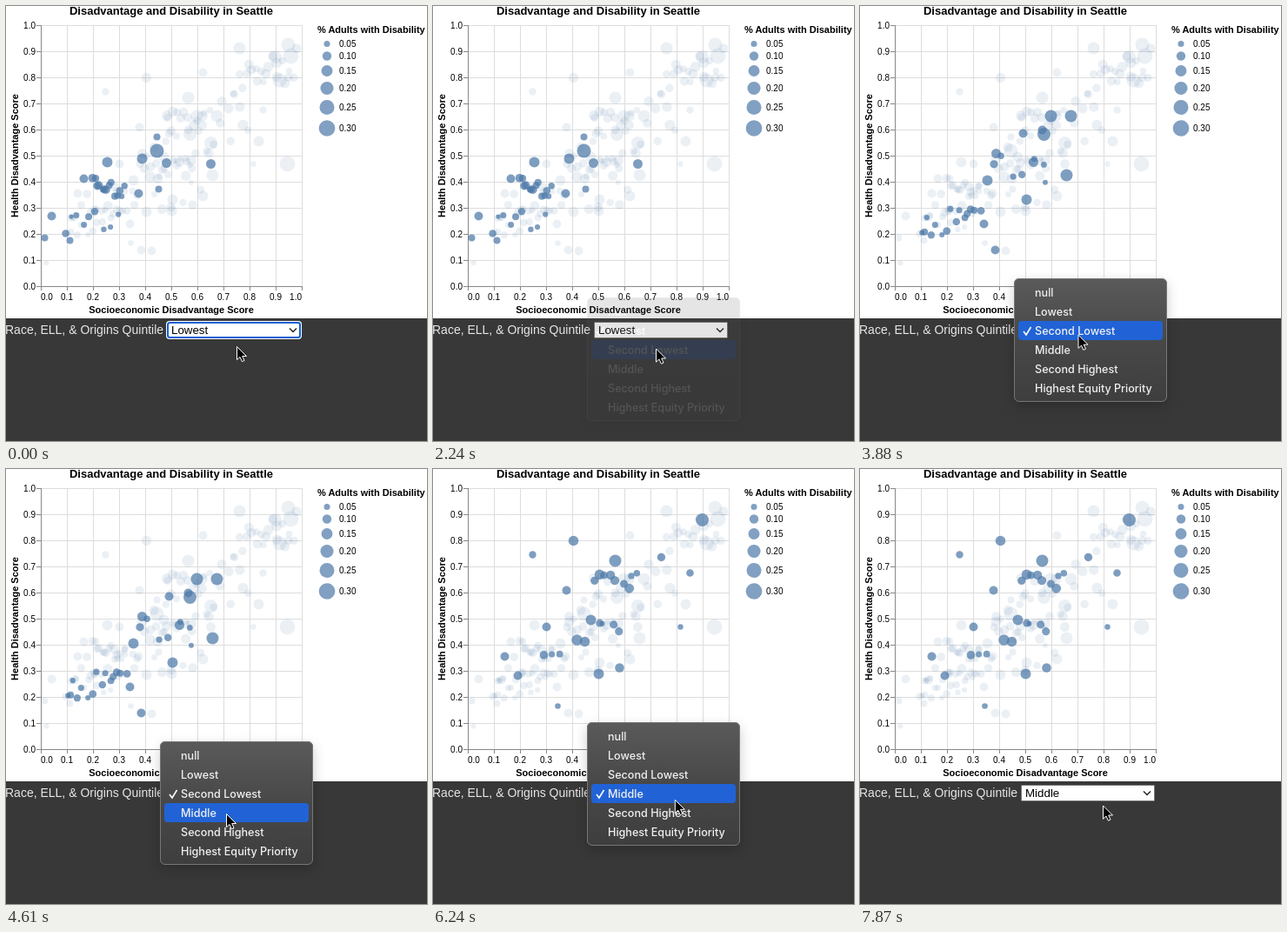
Recreate the animation shown at these times as an HTML page. Size 484 by 500 pixels, loop 8000 ms.

```html
<!DOCTYPE html>
<html lang="en">
<head>
<meta charset="utf-8">
<title>Disadvantage and Disability</title>
<style>
html, body { margin: 0; width: 100%; height: 100%; overflow: hidden; background: #383838; }
svg { display: block; width: 484px; height: 500px; font: 10px "Liberation Sans", Arial, sans-serif; }
.bold { font-weight: bold; font-size: 11px; }
.mid { text-anchor: middle; }
.end { text-anchor: end; }
#dots { fill: #4c78a8; }
#menu text { font: 500 12.6px Inter, "Open Sans", sans-serif; fill: #f0f0f0; }
#panel { filter: drop-shadow(0 5px 7px #0003); }
</style>
</head>
<body>
<svg viewBox="0 0 484 500">
  <defs>
    <linearGradient id="shade" x2="0" y2="1">
      <stop stop-color="#5a5a5a"/><stop offset=".5" stop-color="#484848"/><stop offset="1" stop-color="#3e3e3e"/>
    </linearGradient>
  </defs>
  <rect width="484" height="500" fill="#383838"/>
  <rect width="484" height="359" fill="#fff"/>
  <g id="axes"></g>
  <g id="dots"></g>
  <text class="bold mid" x="190" y="10" style="font-size:13px">Disadvantage and Disability in Seattle</text>
  <text class="bold mid" x="190" y="353">Socioeconomic Disadvantage Score</text>
  <text class="bold mid" transform="translate(13.5 172) rotate(-90)">Health Disadvantage Score</text>
  <g id="legend"><text class="bold" x="358" y="31">% Adults with Disability</text></g>

  <text x="-1" y="377" font-size="14" fill="#e6e6e6">Race, ELL, &amp; Origins Quintile</text>
  <rect x="185.5" y="363.5" width="153" height="18" rx="1" fill="#fff" stroke="#767676"/>
  <g id="ring">
    <rect x="184" y="362" width="156" height="21" rx="4" fill="#fff"/>
    <rect x="186" y="364" width="152" height="17" rx="2.5" fill="#fff" stroke="#1160d2" stroke-width="2"/>
  </g>
  <text id="value" x="190" y="377" font-size="13.333"></text>
  <path d="M326 370.5l4 4 4-4" fill="none" stroke="#222" stroke-width="1.4"/>

  <g id="menu">
    <rect id="panel" x="177" width="176" height="142" rx="6" fill="url(#shade)"/>
    <rect x="177.5" y=".5" width="175" height="141" rx="5.5" fill="none" stroke="#777"/>
    <rect id="bar" x="182" width="166" height="22" rx="4" fill="#2163d6"/>
    <path id="check" fill="none" stroke="#fff" stroke-width="1.6"/>
  </g>
  <path id="arrow" d="M0 0V15.2L3.5 12 5.9 17.2 8.5 16 6.2 11H11Z" stroke="#fff" stroke-linejoin="round"/>
</svg>
<script>
const $ = id => document.getElementById(id);
function add(parent, tag, attrs, text) {
  const el = document.createElementNS("http://www.w3.org/2000/svg", tag);
  for (const k in attrs) el.setAttribute(k, attrs[k]);
  if (text) el.textContent = text;
  return parent.appendChild(el);
}

// Axes and grid
const axes = $("axes");
const line = (d, stroke) => add(axes, "path", { d, stroke, fill: "none" });
for (let i = 0; i <= 10; i++) {
  const x = 40.5 + 30 * i, y = 322.5 - 30 * i, label = (i / 10).toFixed(1);
  line(`M${x} 22V322M40 ${y}H340`, "#ddd");
  line(`M${x} 322v5M35 ${y}h5`, "#888");
  add(axes, "text", { x: 34, y: y + 3, class: "end" }, label);
  add(axes, "text", { x: x - .5, y: 338, class: i == 10 ? "end" : i ? "mid" : "" }, label);
}
line("M40.5 22V322.5H340.5", "#888");

// Legend
[43, 57, 74, 94, 116, 140].forEach((y, i) => {
  const share = (i + 1) * .05;
  add($("legend"), "circle", { cx: 369, cy: y + .5, r: 18 * Math.sqrt(share) - .5, fill: "#4c78a8", "fill-opacity": .7 });
  add($("legend"), "text", { x: 383, y: y + 3.5 }, share.toFixed(2));
});

// Each quintile: a few marked dots, plus seeded dots scattered about a line
let seed = 11;
const rand = () => (seed = seed * 16807 % 2147483647) / 2147483647;

function dots(opacityGroup, ...marked) {
  for (const [x, y, r] of marked)
    add(opacityGroup, "circle", { cx: x + .5, cy: y + .5, r });
}
function scatter(group, n, [x0, y0], [x1, y1], jitter, size) {
  for (let i = 0; i < n; i++) {
    const u = (i + rand()) / n, off = (rand() - .5) * 2 * jitter;
    dots(group, [x0 + (x1 - x0) * u, y0 + (y1 - y0) * u + off, size * (.75 + .5 * rand())]);
  }
}
const [upper, lowest, second, middle] = [0, 1, 2, 3].map(() => add($("dots"), "g", {}));

dots(upper, [323, 181, 9], [324, 44, 8], [327, 57, 9], [314, 85, 8], [268, 48, 7], [235, 157, 7.5],
  [226, 76, 5], [290, 155, 6], [226, 218, 6], [161, 236, 6], [167, 281, 5], [46, 295, 3]);
scatter(upper, 20, [268, 80], [334, 68], 20, 5);
scatter(upper, 24, [165, 160], [280, 125], 32, 5);
scatter(upper, 24, [70, 245], [225, 190], 28, 4.6);

dots(lowest, [173, 166, 8], [235, 181, 5.5], [184, 180, 5.5], [156, 175, 6], [173, 150, 4], [116, 179, 6],
  [89, 198, 5], [52, 241, 5], [44, 266, 4], [73, 269, 4], [152, 215, 5], [175, 210, 4]);
scatter(lowest, 14, [98, 202], [136, 214], 8, 4);
scatter(lowest, 9, [60, 258], [133, 240], 13, 3.5);

dots(second, [242, 126, 7], [219, 126, 7], [211, 147, 7.5], [209, 142, 5], [237, 194, 7], [191, 222, 6],
  [187, 146, 5], [155, 280, 5], [146, 200, 6], [156, 169, 5.5], [199, 179, 5.5], [142, 250, 5]);
scatter(second, 15, [66, 258], [140, 232], 16, 3.8);
scatter(second, 7, [150, 182], [222, 192], 16, 3.8);

dots(middle, [309, 58, 7.5], [209, 105, 7], [161, 82, 5.8], [114, 98, 4.2], [262, 101, 4.7], [295, 119, 4.3],
  [284, 181, 3.2], [214, 228, 5.3], [165, 196, 6.3], [174, 198, 5.8], [190, 235, 6], [181, 173, 6],
  [82, 215, 5], [97, 237, 5], [130, 181, 5], [153, 139, 5], [143, 272, 3.3]);
scatter(middle, 9, [180, 130], [240, 128], 9, 4.8);
scatter(middle, 4, [184, 172], [215, 184], 5, 4);
scatter(middle, 3, [124, 214], [146, 213], 1, 4);

const groups = [upper, lowest, second, middle];

// Menu
const options = ["null", "Lowest", "Second Lowest", "Middle", "Second Highest", "Highest Equity Priority"];
options.forEach((name, i) => add($("menu"), "text", { x: 201, y: 21 + 22 * i }, name));

// Stepped pointer moves: start, end, steps, x, y
const moves = [
  [150, 600, 4, 255.5, 371], [1190, 1490, 3, 256.5, 394], [2680, 3130, 4, 250.5, 374.5],
  [3880, 4610, 6, 253.5, 396.5], [5350, 5650, 3, 278, 374.5], [6240, 6830, 5, 279.5, 403.5],
  [7130, 7130, 1, 279.5, 401], [7580, 7870, 3, 279.5, 387]];
// Menu: opens, fades, closes
const menus = [[890, 2240, 2380], [3580, 4910, 5060], [5940, 7725, 7870]];

function pointer(t) {
  let x = 265.5, y = 391.5;
  for (const [start, end, n, toX, toY] of moves) {
    if (t < start) break;
    const gap = n > 1 ? (end - start) / (n - 1) : 1;
    const k = Math.min(1, (Math.floor((t - start) / gap + .01) + 1) / n);
    x += (toX - x) * k;
    y += (toY - y) * k;
  }
  return [x, y];
}

function draw(t) {
  const choice = t < 2380 ? 1 : t < 5060 ? 2 : 3;
  groups.forEach((g, i) => g.setAttribute("fill-opacity", i == choice ? .72 : .11));
  $("value").textContent = options[choice];

  const [x, y] = pointer(t);
  $("arrow").setAttribute("transform", `translate(${x} ${y})`);

  const open = menus.find(m => t >= m[0] && t < m[2]);
  const fading = open && t >= open[1];
  $("ring").style.display = fading || t >= 7725 ? "none" : "";
  $("menu").style.display = open ? "" : "none";
  if (!open) return;
  const top = 357 - 22 * choice;
  const row = Math.floor((y - top - 5) / 22);
  $("menu").setAttribute("transform", `translate(0 ${top})`);
  $("menu").setAttribute("opacity", fading ? .15 : 1);
  $("bar").setAttribute("y", 5 + 22 * row);
  $("check").setAttribute("d", `M188 ${17 + 22 * choice}l3 4 5.5-9`);
}

const begin = performance.now();
function tick() {
  draw((performance.now() - begin) % 8000);
  requestAnimationFrame(tick);
}
tick();
</script>
</body>
</html>
```
